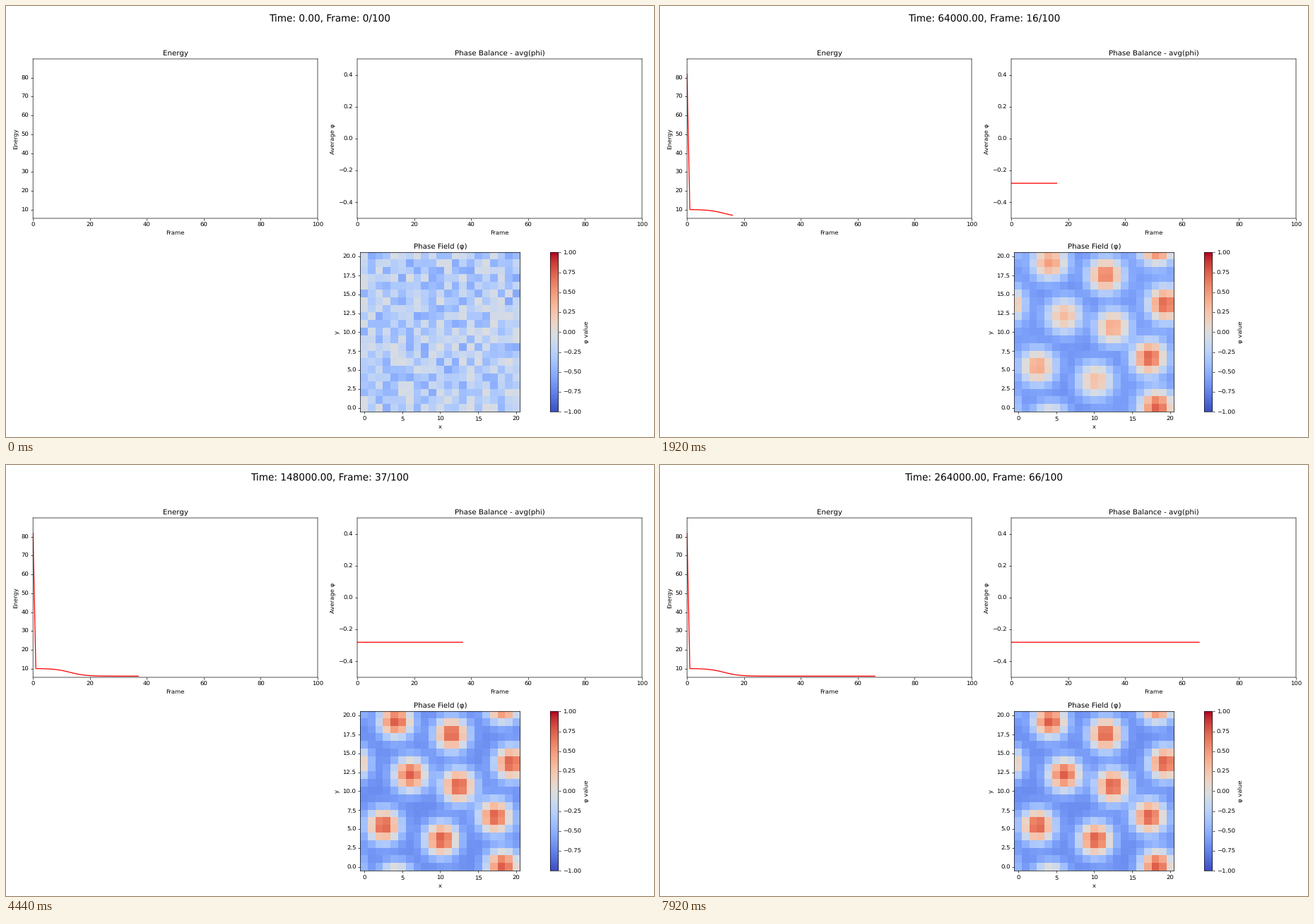
Animation of 917 by 611 pixels, one loop 8 s. Source, as a matplotlib script:

```python
import numpy as np
import matplotlib.pyplot as plt
from matplotlib.animation import FuncAnimation

plt.rcParams["text.hinting"] = "none"
plt.rcParams["path.snap"] = False

W, H, DPI = 917, 611, 61.13
N = 21            # grid cells per side, periodic
MEAN = -0.28      # conserved average of the field
STEPS, TICKS = 67, 3

# x, y and onset step of each droplet
DROPS = [
    (18.2, 0.1, 10.3), (17.2, 6.6, 10.3), (19.3, 13.6, 10.5),
    (11.5, 17.4, 12.0), (12.4, 10.6, 14.0), (4.2, 19.1, 13.6),
    (2.6, 5.4, 14.0), (6.1, 12.1, 15.0), (10.2, 3.6, 15.2),
]

gy, gx = np.mgrid[0:N, 0:N]


def wrap(d):
    return (d + N / 2) % N - N / 2


def logistic(t):
    return 1 / (1 + np.exp(-t))


def droplets(k):
    total = np.zeros((N, N))
    for x, y, onset in DROPS:
        r = np.hypot(wrap(gx - x), wrap(gy - y))
        g = logistic(0.35 * (k - onset))
        halo = 0.25 * g * (1 - g) * np.exp(-((r - 3.9) / 1.2) ** 2)
        total += 1.46 * g * np.exp(-(r / 2.17) ** 2.3) - halo
    return MEAN + total - total.mean()


steps = np.arange(STEPS)
energy = 6.03 + 4.05 * logistic((13 - steps) / 2.7)
energy[0] = 81.8
balance = np.full(STEPS, MEAN)
noise = np.random.default_rng(4).uniform(-0.54, -0.02, (N, N))
fields = [noise] + [droplets(k) for k in steps[1:]]

fig = plt.figure(figsize=((W + 0.01) / DPI, (H + 0.01) / DPI), dpi=DPI,
                 facecolor="white")


def panel(left, top, right, bottom, title="", xlabel="", ylabel=""):
    ax = fig.add_axes([left / W, 1 - bottom / H,
                       (right - left) / W, (bottom - top) / H])
    ax.set_title(title)
    ax.set_xlabel(xlabel)
    ax.set_ylabel(ylabel)
    return ax


ax_energy = panel(38.2, 75, 441, 301, "Energy", "Frame", "Energy")
ax_energy.set(xlim=(0, 100), ylim=(5.4, 89.95))
ax_balance = panel(497, 75, 900, 301, "Phase Balance - avg(phi)",
                   "Frame", "Average φ")
ax_balance.set(xlim=(0, 100), ylim=(-0.5, 0.5),
               yticks=np.linspace(-0.4, 0.4, 5))
ax_field = panel(501.4, 349.5, 727.4, 575.5, "Phase Field (φ)", "x", "y")
ax_bar = panel(770.3, 349.5, 781.7, 575.5)

energy_line, = ax_energy.plot([], [], "r-")
balance_line, = ax_balance.plot([], [], "r-")
image = ax_field.imshow(noise, cmap="coolwarm", vmin=-1, vmax=1,
                        origin="lower", aspect="auto")
ax_field.set_xticks(np.arange(0, N, 5))
ax_field.set_yticks(np.arange(0, N, 2.5))
fig.colorbar(image, cax=ax_bar, label="φ value",
             ticks=np.linspace(-1, 1, 9))
heading = fig.suptitle("", fontsize=16, y=0.98)


def update(i):
    k = i // TICKS
    heading.set_text(f"Time: {4000 * k:.2f}, Frame: {k}/100")
    energy_line.set_data(steps[:k + 1], energy[:k + 1])
    balance_line.set_data(steps[:k + 1], balance[:k + 1])
    image.set_data(fields[k])
    return heading, energy_line, balance_line, image


anim = FuncAnimation(fig, update, frames=200, interval=40, repeat=True,
                     repeat_delay=0, blit=False)
plt.show()
```
